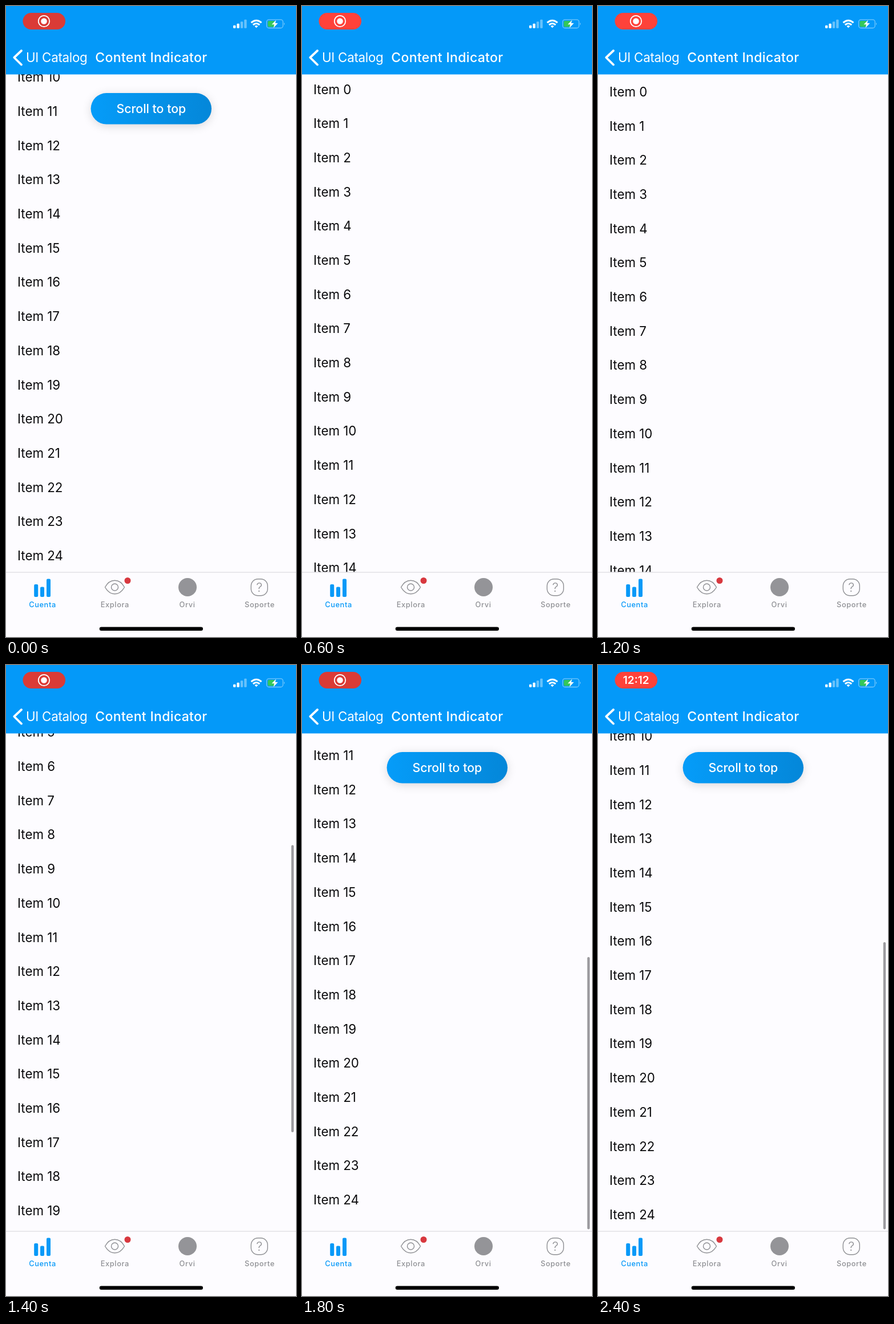
Recreate the animation shown at these times as an HTML page. Size 508 by 1102 pixels, loop 2.5 s.

```html
<!DOCTYPE html>
<html lang="en">
<head>
<meta charset="utf-8">
<title>Content Indicator</title>
<style>
  html, body { margin: 0; width: 100%; height: 100%; overflow: hidden; background: #fdfcff; }
  svg { display: block; width: 100%; height: 100%; font-family: Inter, "Liberation Sans", sans-serif; }
  .body { font-size: 22.3px; }
  .tab { font-size: 12.8px; font-weight: 450; letter-spacing: .6px; text-anchor: middle; fill: #8f9094; }
  .line { fill: none; stroke: #8f9094; stroke-width: 1.4; }
</style>
</head>
<body>
<svg viewBox="0 0 508 1102">
  <defs>
    <linearGradient id="blue">
      <stop offset="0" stop-color="#059cf9"/>
      <stop offset="1" stop-color="#0487d9"/>
    </linearGradient>
    <filter id="blur" x="-20%" y="-60%" width="140%" height="220%">
      <feGaussianBlur stdDeviation="9"/>
    </filter>
  </defs>
  <rect width="508" height="1102" fill="#fdfcff"/>

  <g id="list" class="body" fill="#0b0b0d"></g>
  <rect id="bar" x="499.7" width="4.4" rx="2.2" fill="#9c9b9f"/>

  <g id="button">
    <rect x="-104" y="-23" width="208" height="52" rx="26" opacity=".17" filter="url(#blur)"/>
    <rect x="-105.7" y="-27.2" width="211.4" height="54.4" rx="27.2" fill="url(#blue)"/>
    <text y="7.6" font-size="21.3" font-weight="500" text-anchor="middle" fill="#fff">Scroll to top</text>
  </g>

  <rect width="508" height="119.5" fill="#0499f9"/>
  <rect id="pill" x="29.5" y="12" width="74.5" height="29" rx="14.5"/>
  <g id="record">
    <circle cx="66.5" cy="26.5" r="9.7" fill="none" stroke="#fff" stroke-width="1.8"/>
    <circle cx="66.5" cy="26.5" r="5.3" fill="#fff"/>
  </g>
  <text id="clock" x="66.7" y="33" font-size="19" font-weight="600" text-anchor="middle" fill="#fff">12:12</text>

  <g id="signal" fill="#fff"></g>
  <g fill="none" stroke="#fff" stroke-width="3.1">
    <path d="M429.5 29.2Q438.5 21.3 447.5 29.2"/>
    <path d="M432.8 33Q438.5 28 444.2 33"/>
    <path d="M435.6 35.2Q438.5 32.8 441.4 35.2L438.5 38.3Z" fill="#fff" stroke="none"/>
  </g>
  <rect x="456.6" y="23.9" width="28.6" height="14.6" rx="4" fill="none" stroke="#fff" stroke-width="1.3" opacity=".45"/>
  <path d="M487 29Q489.4 31.2 487 33.5Z" fill="#fff" opacity=".5"/>
  <rect x="458.6" y="25.9" width="12.5" height="10.6" rx="2.2" fill="#35c759"/>
  <path d="M473 24.5L465.5 32.3H470L468.6 38.2L476.2 30.1H471.6Z" fill="#fff"/>

  <path d="M27 78L14.3 90L27 102.5" fill="none" stroke="#fff" stroke-width="3.8" stroke-linecap="round" stroke-linejoin="round"/>
  <g fill="#fff">
    <text class="body" x="35" y="97.8" letter-spacing="-.25">UI Catalog</text>
    <text x="156.3" y="97.8" font-size="23" font-weight="500" letter-spacing=".33">Content Indicator</text>
  </g>

  <rect y="989" width="508" height="113" fill="#fdfcff"/>
  <path d="M0 989H508" stroke="#e2e1e5" stroke-width="1.3"/>
  <g fill="#0799f8">
    <rect x="49.2" y="1010" width="7" height="22" rx="2"/>
    <rect x="60" y="1014.5" width="7" height="17.5" rx="2"/>
    <rect x="71" y="1000.5" width="7" height="31.5" rx="2"/>
  </g>
  <path class="line" d="M173.5 1015Q180 1003.3 190.5 1003.3T207.5 1015Q201 1026.7 190.5 1026.7T173.5 1015Z"/>
  <circle class="line" cx="190.5" cy="1015" r="6"/>
  <circle cx="213" cy="1003.5" r="5.5" fill="#d8383f"/>
  <circle cx="318" cy="1015" r="16" fill="#949498"/>
  <rect class="line" x="429.3" y="1000.7" width="29" height="29" rx="12"/>
  <text x="443.8" y="1023" font-size="22" font-weight="300" text-anchor="middle" fill="#8f9094">?</text>
  <g id="tabs"></g>
  <rect x="163.7" y="1084.5" width="181.3" height="6.6" rx="3.3" fill="#000"/>
</svg>

<script>
const LOOP = 2500, STEP = 100;
const ROW = 59.7, FIRST = 149.8, MAX = 622.6;

const $ = id => document.getElementById(id);
const add = (parent, tag, attrs, text = '') => {
  const el = document.createElementNS('http://www.w3.org/2000/svg', tag);
  for (const key in attrs) el.setAttribute(key, attrs[key]);
  el.textContent = text;
  $(parent).append(el);
};
const clamp = v => Math.min(1, Math.max(0, v));
const ramp = (t, start, length) => clamp((t - start) / length);
const ease = u => u * u * (3 - 2 * u);

for (let i = 0; i < 25; i++) add('list', 'text', { x: 20, y: i * ROW + 8.1 }, 'Item ' + i);
[5, 8, 11.5, 15].forEach((h, i) => add('signal', 'rect', {
  x: 398 + i * 6.4, y: 38.8 - h, width: 4.4, height: h, rx: 1.2, opacity: i < 2 ? 1 : .4
}));
['Cuenta', 'Explora', 'Orvi', 'Soporte'].forEach((name, i) => add('tabs', 'text', {
  class: 'tab', x: 64 + i * 126.8, y: 1050.3, style: i ? '' : 'fill:#0799f8'
}, name));

// Tap scrolls to the top, then a flick runs past the end and springs back.
const HIDE = 315, SHOW = 1432, TAP = 320.5, TAP_TIME = 294;
const FLICK = 1210, END = 1516, SPEED = 2.023, DAMP = .0109;

function scrollAt(t) {
  if (t < FLICK) return MAX * (1 - ease(ramp(t, TAP, TAP_TIME)));
  if (t < END) {
    const u = ramp(t, FLICK, END - FLICK);
    return MAX * u * u * (2 - u);
  }
  const s = t - END;
  return MAX + SPEED * s * Math.exp(-DAMP * s);
}

function draw(t) {
  const scroll = scrollAt(t);
  $('list').setAttribute('transform', `translate(0 ${FIRST - scroll})`);

  const over = Math.max(0, scroll - MAX);
  const top = 122 + 362 * Math.min(1, scroll / MAX) + over;
  $('bar').setAttribute('y', top);
  $('bar').setAttribute('height', 501.5 - over);
  $('bar').setAttribute('opacity', ramp(t, FLICK, 60));

  const shown = t < FLICK ? 1 - ease(ramp(t, HIDE, TAP_TIME)) : ease(ramp(t, SHOW, 300));
  $('button').setAttribute('transform', `translate(254.3 179.3) scale(${shown})`);
  $('button').setAttribute('opacity', shown < .01 ? 0 : shown);

  const dim = clamp(.5 + 1.5 * Math.cos((t - 1800) / 1000 * Math.PI));
  $('pill').setAttribute('fill', `rgb(${255 - 37 * dim},${66 - 7 * dim},${58 - 4 * dim})`);
  $('clock').setAttribute('opacity', ramp(t, 1900, 220));
  $('record').setAttribute('opacity', 1 - ramp(t, 1950, 200));
}

let start;
function tick(now) {
  start ??= now;
  // The motion is sampled ten times a second.
  draw(Math.floor(((now - start) % LOOP + 4) / STEP) * STEP % LOOP);
  requestAnimationFrame(tick);
}
draw(0);
requestAnimationFrame(tick);
</script>
</body>
</html>
```
